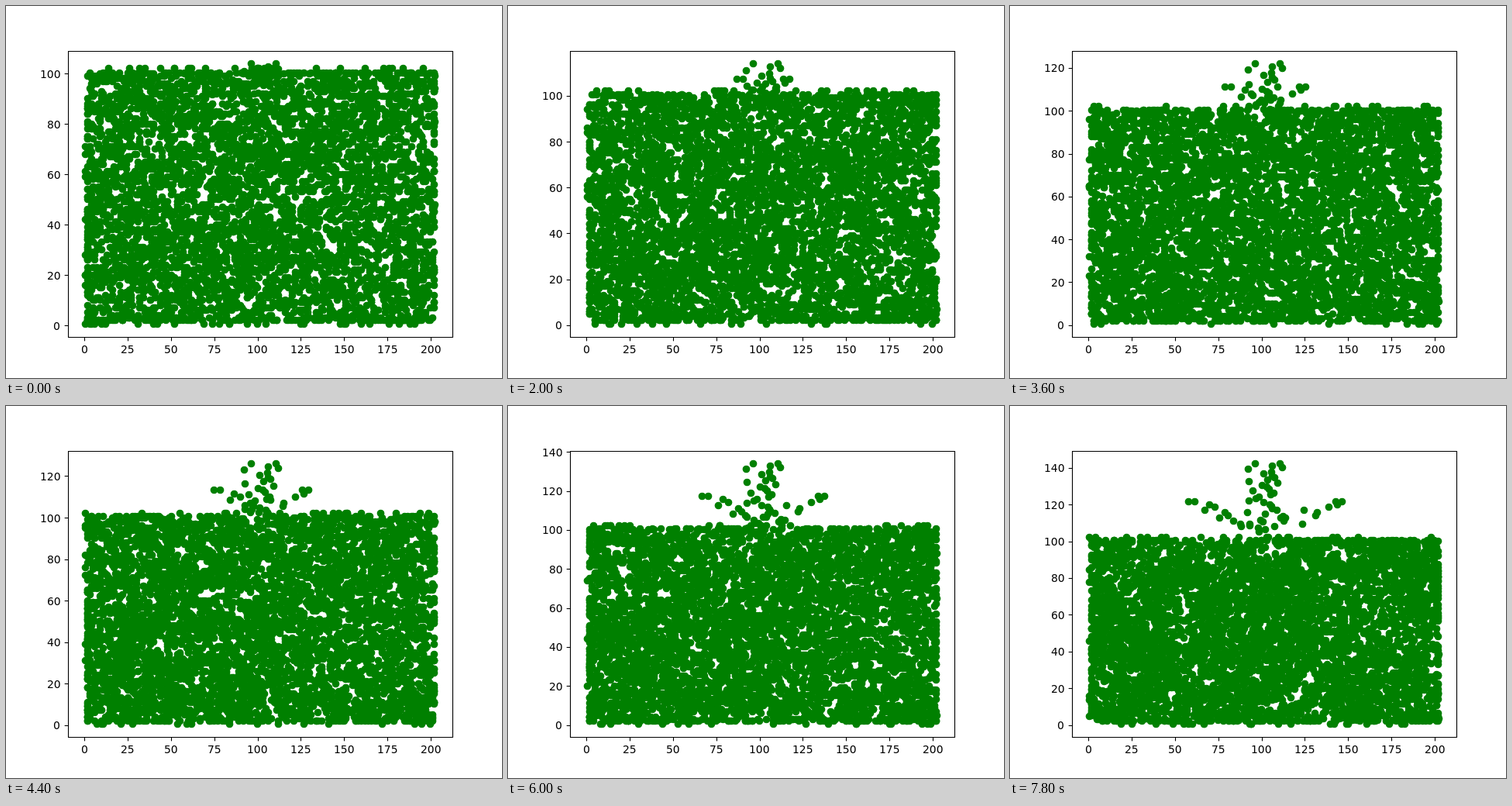
An HTML page with a canvas for the animation above (8000 ms loop, 640 by 480 pixels).

```html
<!DOCTYPE html>
<html lang="en">
<head>
<meta charset="utf-8">
<title>Gas leaking from a box</title>
<style>
  html, body { margin: 0; width: 100%; height: 100%; overflow: hidden; background: #fff; }
  canvas, svg { position: absolute; left: 0; top: 0; width: 640px; height: 480px; }
  text { font: 13.889px "DejaVu Sans", sans-serif; fill: #000; }
  path { stroke: #000; stroke-width: 1.11; fill: none; }
</style>
</head>
<body>
<canvas width="640" height="480"></canvas>
<svg viewBox="0 0 640 480">
  <path d="M80.5 58.5H576.5V427.5H80.5Z"/>
</svg>
<script>
const STEP = 200, STEPS = 40, GAS = 5000, RISERS = 32, SIDE = 9;
const LEAK = 101, DIGIT = 8.84;
const ctx = document.querySelector('canvas').getContext('2d');
const svg = document.querySelector('svg');

// Small seeded generator, so every load gives the same gas.
let seed = 20117;
function random() {
  seed = (seed + 0x6D2B79F5) | 0;
  let h = Math.imul(seed ^ (seed >>> 15), 1 | seed);
  h = (h + Math.imul(h ^ (h >>> 7), 61 | h)) ^ h;
  return ((h ^ (h >>> 14)) >>> 0) / 4294967296;
}
const between = (low, high) => low + random() * (high - low);

// The gas moves in six directions: up, down and four slants.
const gas = Array.from({ length: GAS }, () => {
  const vx = Math.floor(between(-1, 2));
  const vy = (random() < .5 ? -1 : 1) * (vx ? .5 : 1);
  return {
    x: Math.floor(between(0, 204)), y: Math.floor(between(0, 103)), vx, vy,
    outer: random() < .24, sparse: random() < .4
  };
});

// Escaped straight up: x and distance below the highest particle.
const risers = [[96.2, 0], [110.6, 0], [106, 1.4], [112, 2.1], [92.2, 3]];
for (let i = 0; i < RISERS; i++) {
  const spread = 9 + i / 8;
  risers.push([LEAK + between(-spread, spread), 4.5 + i * 1.05]);
}

// Escaped sideways: side, x at the opening, and age at the last step.
const drifters = [];
for (const side of [-1, 1]) {
  drifters.push([side, 100.5, 42.5], [side, 104, 42.5]);
  for (let i = 0; i < SIDE; i++) {
    drifters.push([side, LEAK - side * between(-8, 12), 39 - 3 * i]);
  }
}

const dot = document.createElement('canvas');
dot.width = dot.height = 11;
const dotCtx = dot.getContext('2d');
dotCtx.fillStyle = '#008000';
dotCtx.arc(5.5, 5.5, 4.86, 0, 2 * Math.PI);
dotCtx.fill();

const toX = x => 102.55 + (x - .5) * 2.232;
const topAt = n => 104 + n - .08 * Math.max(0, n - 30);
const snap = v => Math.floor(v + .5) + .5;
const textWidth = value => String(value).length * DIGIT;

// Reflects v between 0 and size.
function fold(v, size) {
  const m = ((v % (2 * size)) + 2 * size) % (2 * size);
  return m > size ? 2 * size - m : m;
}

// Particles at a wall line up in an inner or an outer row.
function settle(v, [outerLow, low, high, outerHigh], outer) {
  if (v < low) return outer ? outerLow : low;
  if (v > high) return outer ? outerHigh : high;
  return v;
}

function addTick(value) {
  const add = tag => svg.appendChild(document.createElementNS(svg.namespaceURI, tag));
  const line = add('path'), label = add('text');
  label.textContent = value;
  return { value, line, label };
}

function placeTick({ line, label }, path, x, y) {
  line.setAttribute('d', path);
  label.setAttribute('x', Math.round(x));
  label.setAttribute('y', Math.round(y));
}

for (let v = 0; v <= 200; v += 25) {
  const x = toX(v);
  placeTick(addTick(v), `M${snap(x)} 427.5v4.86`, x - textWidth(v) / 2, 448);
}
const yTicks = [];
for (let v = 0; v <= 140; v += 20) yTicks.push(addTick(v));

function draw(n) {
  const top = topAt(n), scale = 336 / (top - .5);
  const toY = y => 410.4 - (y - .5) * scale;
  const plot = (x, y) => ctx.drawImage(dot, Math.floor(toX(x)) - 5, Math.floor(toY(y)) - 5);

  for (const tick of yTicks) {
    const y = toY(tick.value);
    tick.line.style.display = tick.label.style.display = y < 57.6 ? 'none' : '';
    placeTick(tick, `M80.5 ${snap(y)}h-4.86`, 70.3 - textWidth(tick.value), y + 5.5);
  }

  ctx.clearRect(0, 0, 640, 480);
  for (const p of gas) {
    const x = settle(fold(p.x + p.vx * n, 203), [.5, 2, 202, 202.5], p.outer);
    const y = settle(fold(p.y + p.vy * n, 102), [.5, 2, 100.4, 102], p.outer);
    const inLeak = Math.abs(x - LEAK) < 11 && y > 90;
    if (!(inLeak && p.sparse && n > 2)) plot(x, y);
  }
  for (const [x, depth] of risers) plot(x, top - depth);
  for (const [side, x, lastAge] of drifters) {
    const age = lastAge - (STEPS - 1 - n);
    plot(x + side * age, 100.5 + age / 2);
  }
}

let shown = -1;
function tick(time) {
  const n = Math.floor(time / STEP) % STEPS;
  if (n !== shown) draw(shown = n);
  requestAnimationFrame(tick);
}
draw(shown = 0);
requestAnimationFrame(tick);
</script>
</body>
</html>
```
